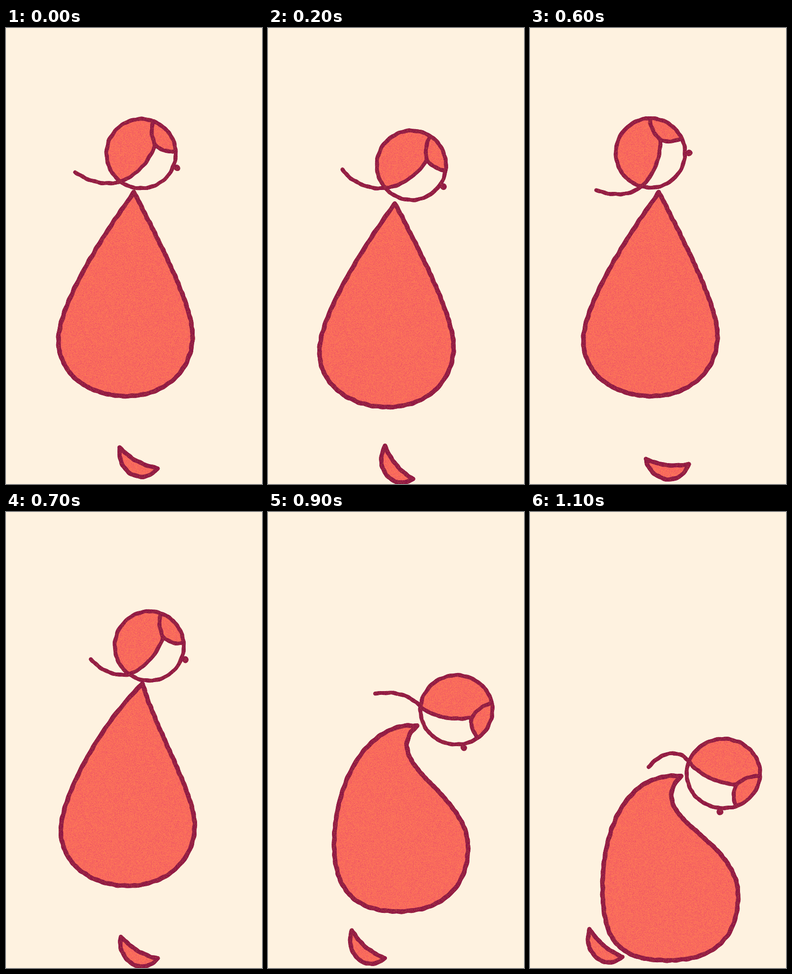
Write an HTML page with a canvas that moves like this. It is 540 by 960 pixels and loops after 1.2 s.

```html
<!DOCTYPE html>
<html lang="en">
<head>
<meta charset="utf-8">
<title>Bowing figure</title>
<style>
  html, body { margin: 0; width: 100%; height: 100%; overflow: hidden; background: #fef2e0; }
  canvas { display: block; width: 540px; height: 960px; }
</style>
</head>
<body>
<canvas id="stage" width="540" height="960"></canvas>
<script>
const W = 540, H = 960, LOOP = 1200, STEP = 100;
const FILL = '#fc6c5c', LINE = '#861440';
const ctx = document.getElementById('stage').getContext('2d');

// Body: apex, left control, left, bottom, right, right control,
// then side handle lengths and bottom fullness (left, right)
const REST = [270, 346, 188, 458, 110.5, 658, 255, 775, 393.5, 648, 330, 462, 68, 63, 0.58, 0.58];
const moved = (dx, dy) => REST.map((v, i) => i > 11 ? v : v + (i % 2 ? dy : dx));

// Head: centre, tilt, x radius. Tail: two controls, end. Foot: tip, tilt.
const KEYS = [
  { t: 0, body: REST, head: [285, 264.5, 21.5, 73],
    tail: [222, 331, 180, 329, 146, 303], foot: [240, 883, 28.8] },
  { t: 200, body: moved(-2, 23), head: [302.5, 289, 33.7, 73],
    tail: [222, 341, 180, 330, 157, 298], foot: [247, 880, 50] },
  { t: 400, body: moved(1.5, 0), head: [262, 262, 5.5, 73],
    tail: [214, 342, 172, 347, 140, 328], foot: [239, 888, 23.2] },
  { t: 600, body: moved(2, 0), head: [254, 263, 0, 73],
    tail: [213, 353, 175, 355, 139, 341], foot: [244, 907, 7] },
  { t: 800,
    body: [307, 389, 217, 425, 122, 688, 260, 806, 404, 677, 286, 460, 88, 77, 0.58, 0.58],
    head: [362, 319.5, 49, 73],
    tail: [270, 347, 238, 326, 222, 290], foot: [230, 877, 56] },
  { t: 900,
    body: [314, 450, 210, 440, 139.5, 700, 275, 841, 422, 706, 230, 530, 130, 116, 0.68, 0.62],
    head: [397.5, 416.5, 79.5, 76],
    tail: [300, 386, 275, 377, 226, 382], foot: [177, 881, 40] },
  { t: 1100,
    body: [318, 556, 201, 546, 153, 790, 290, 944, 439, 806, 235, 645, 118, 121, 0.74, 0.66],
    head: [408, 550.5, 95, 77.5],
    tail: [314, 499, 282, 502, 250, 537], foot: [126, 878, 40] }
];

// Smooth curve through the keys, with one-sided slopes at both ends
function pose(part, t) {
  let i = 0;
  while (i < KEYS.length - 2 && t >= KEYS[i + 1].t) i++;
  const a = KEYS[i], b = KEYS[i + 1], span = b.t - a.t, u = (t - a.t) / span;
  const before = KEYS[Math.max(i - 1, 0)], after = KEYS[Math.min(i + 2, KEYS.length - 1)];
  return a[part].map((p, k) => {
    const q = b[part][k];
    const m = (q - before[part][k]) / (b.t - before.t) * span;
    const n = (after[part][k] - p) / (after.t - a.t) * span;
    const d = q - p;
    return p + u * (m + u * (3 * d - 2 * m - n + u * (m + n - 2 * d)));
  });
}

function curve(p, a, b, q) {
  const length = Math.hypot(a[0] - p[0], a[1] - p[1]) + Math.hypot(b[0] - a[0], b[1] - a[1]) +
    Math.hypot(q[0] - b[0], q[1] - b[1]);
  const n = Math.ceil(length / 3), points = [];
  for (let i = 0; i <= n; i++) {
    const t = i / n, s = 1 - t;
    points.push([0, 1].map(k =>
      s * s * s * p[k] + 3 * s * s * t * a[k] + 3 * s * t * t * b[k] + t * t * t * q[k]));
  }
  return points;
}

function arc(r, from, to) {
  const points = [], n = Math.ceil(Math.abs(to - from) / 2.5);
  for (let i = 0; i <= n; i++) {
    const a = (from + (to - from) * i / n) * Math.PI / 180;
    points.push([r * Math.cos(a), r * Math.sin(a)]);
  }
  return points;
}

const place = (x, y, deg, sx = 1) => {
  const c = Math.cos(deg * Math.PI / 180), s = Math.sin(deg * Math.PI / 180);
  return ([px, py]) => [x + sx * (c * px - s * py), y + s * px + c * py];
};

// Hand-drawn unevenness, fixed to the page
const rough = ([x, y]) => [
  x + 0.4 * Math.sin(0.29 * y + 0.11 * x) + 0.3 * Math.sin(0.17 * x - 0.2 * y + 2),
  y + 0.4 * Math.sin(0.28 * x - 0.13 * y) + 0.3 * Math.sin(0.15 * x + 0.22 * y + 1)
];

function fill(points, color) {
  ctx.beginPath();
  points.map(rough).forEach(p => ctx.lineTo(p[0], p[1]));
  ctx.fillStyle = color;
  ctx.fill();
}

function stroke(points, width) {
  ctx.strokeStyle = LINE;
  ctx.lineCap = 'round';
  points.map(rough).forEach((p, i, all) => {
    if (!i) return;
    ctx.lineWidth = width + 0.6 * Math.sin(0.33 * p[0] + 0.4 * p[1]);
    ctx.beginPath();
    ctx.moveTo(all[i - 1][0], all[i - 1][1]);
    ctx.lineTo(p[0], p[1]);
    ctx.stroke();
  });
}

function makeGrain() {
  const layer = document.createElement('canvas');
  layer.width = W;
  layer.height = H;
  const g = layer.getContext('2d'), img = g.createImageData(W, H);
  let seed = 7;
  const random = () => (seed = (seed * 1664525 + 1013904223) >>> 0) / 4294967296;
  for (let i = 0; i < img.data.length; i += 4) {
    const color = random() < 0.5 ? [255, 160, 70] : [205, 30, 115];
    img.data.set([...color, 80 * random()], i);
  }
  g.putImageData(img, 0, 0);
  return layer;
}
const grain = makeGrain();

function drawBody(t) {
  const [ax, ay, lcx, lcy, lx, ly, bx, by, rx, ry, rcx, rcy, lh, rh, lk, rk] = pose('body', t);
  const outline = [
    ...curve([ax, ay], [rcx, rcy], [rx, ry - rh], [rx, ry]),
    ...curve([rx, ry], [rx, ry + rk * (by - ry)], [bx + rk * (rx - bx), by], [bx, by]),
    ...curve([bx, by], [bx + lk * (lx - bx), by], [lx, ly + lk * (by - ly)], [lx, ly]),
    ...curve([lx, ly], [lx, ly - lh], [lcx, lcy], [ax, ay])
  ];
  fill(outline, FILL);
  stroke(outline, 9.3);
}

function drawFoot(t) {
  const outline = [
    ...curve([0, 0], [30, 10], [60, 10], [91, 0]),
    ...curve([91, 0], [83, 50], [18, 49], [0, 0])
  ].map(place(...pose('foot', t)));
  fill(outline, FILL);
  stroke(outline, 8.8);
}

function drawHead(t) {
  const [cx, cy, tilt, rx] = pose('head', t);
  const [ax, ay, bx, by, ex, ey] = pose('tail', t);
  const put = place(cx, cy, tilt, rx / 73);
  const part = [21, -28], nape = [-19, 70], temple = [66, -31];
  const crown = curve([-1, -73], [0, -54], [9, -38], part).map(put);
  const fringe = curve(temple, [51, -23], [33, -22], part).map(put);
  const sweep = curve(part, [22, 13], [5, 50], nape).map(put);
  fill([...arc(73, 105, 335).map(put), ...fringe, ...sweep], FILL);
  stroke(arc(73, 0, 360).map(put), 8);
  stroke(crown, 8);
  stroke(fringe, 8);
  stroke(sweep, 8);
  stroke(curve(put(nape), [ax, ay], [bx, by], [ex, ey]), 8);
  const nose = put([81.5, 0]);
  fill(arc(6.8, 0, 360).map(p => [p[0] + nose[0], p[1] + nose[1]]), LINE);
}

function draw(t) {
  ctx.clearRect(0, 0, W, H);
  drawBody(t);
  drawFoot(t);
  drawHead(t);
  ctx.globalCompositeOperation = 'source-atop';
  ctx.drawImage(grain, 0, 0);
  ctx.globalCompositeOperation = 'source-over';
}

const start = performance.now();
let shown = -1;
function tick() {
  let t = Math.floor((performance.now() - start) % LOOP / STEP) * STEP;
  if (t === 500) t = 400; // held pose
  if (t !== shown) draw(shown = t);
  requestAnimationFrame(tick);
}
tick();
</script>
</body>
</html>
```
